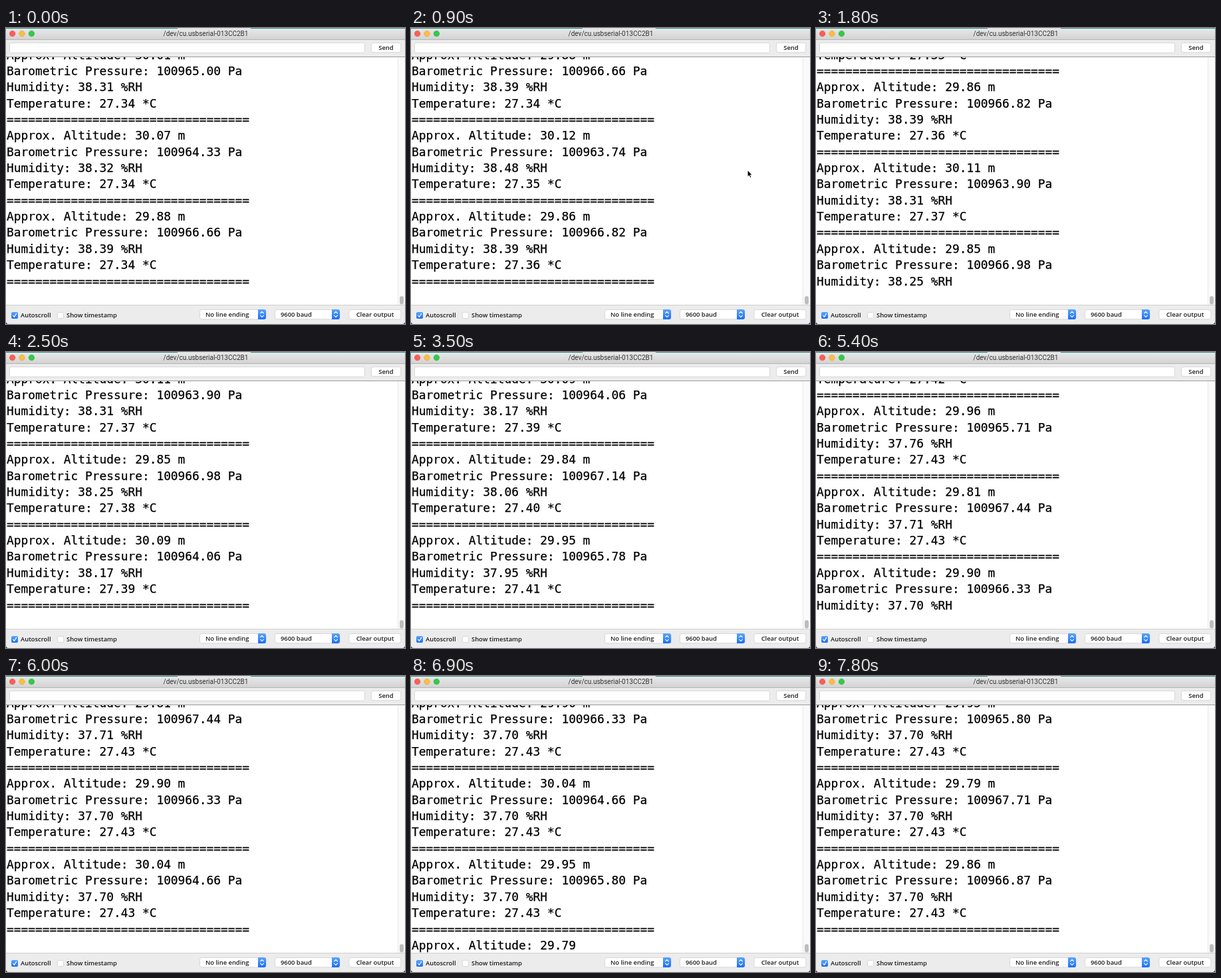
Animation of 600x446 px, one loop 7900 ms. Source, as an HTML page:

```html
<!DOCTYPE html>
<html lang="en">
<head>
<meta charset="utf-8">
<title>Serial monitor</title>
<style>
  html, body { margin: 0; width: 100%; height: 100%; overflow: hidden; background: #ececec; }
  svg { display: block; width: 600px; height: 446px; }
  .ui { font: 600 9.4px "Open Sans", "Noto Sans", sans-serif; fill: #1c1c1c; }
  .title { font: 10px Roboto, sans-serif; fill: #333; }
  .mid { text-anchor: middle; }
  .box { fill: #fff; stroke: #d0d0d0; stroke-width: .8; }
  .chev { fill: none; stroke: #fff; stroke-width: 1.2; stroke-linecap: round; stroke-linejoin: round; }
  .log { font: 17.83px "DejaVu Sans Mono", monospace; stroke: #000; stroke-width: .25; }
</style>
</head>
<body>
<svg viewBox="0 0 600 446">
  <defs>
    <linearGradient id="bar" x2="0" y2="1">
      <stop stop-color="#e9e9e9"/><stop offset="1" stop-color="#d3d3d3"/>
    </linearGradient>
    <linearGradient id="blue" x2="0" y2="1">
      <stop stop-color="#5aa5fb"/><stop offset="1" stop-color="#1a6dfa"/>
    </linearGradient>
    <clipPath id="pane"><path d="M0 44H589V417H0Z"/></clipPath>
    <g id="arrows">
      <path d="M0 0H9a3 3 0 0 1 3 3V12a3 3 0 0 1-3 3H0Z" fill="url(#blue)"/>
      <path class="chev" d="M3.6 5.8L6 3.4L8.4 5.8M3.6 9.2L6 11.6L8.4 9.2"/>
    </g>
  </defs>

  <rect width="600" height="446" fill="#ececec"/>
  <rect width="600" height="17" fill="url(#bar)"/>
  <rect width="600" height="1" fill="#2f8f8c"/>
  <rect x="258" width="110" height="1" fill="#d8e4e2"/>
  <rect y="17" width="600" height="1" fill="#b4b4b4"/>
  <g stroke-width=".5">
    <circle cx="9.6" cy="8.5" r="4.3" fill="#fc5d57" stroke="#df4640"/>
    <circle cx="24" cy="8.5" r="4.3" fill="#fdbd3f" stroke="#de9f34"/>
    <circle cx="38.4" cy="8.5" r="4.3" fill="#34c84a" stroke="#27aa35"/>
  </g>
  <text class="title mid" x="300.5" y="12.2">/dev/cu.usbserial-013CC2B1</text>

  <rect class="box" x="5.4" y="22.4" width="534" height="15" rx="2"/>
  <rect class="box" x="549.4" y="22.4" width="44.4" height="14.4" rx="3"/>
  <text class="ui mid" x="571.5" y="32.7">Send</text>

  <rect y="43" width="600" height="374.5" fill="#fff"/>
  <rect y="43" width="600" height="1" fill="#9c9c9c"/>
  <rect x="589" y="44" width="11" height="373" fill="#fafafa"/>
  <rect x="589" y="44" width=".8" height="373" fill="#e4e4e4"/>
  <rect x="592" y="404" width="6" height="12.6" rx="3" fill="#bdbdbd"/>
  <g id="log" class="log" clip-path="url(#pane)"></g>
  <rect y="417" width="600" height=".8" fill="#c6c6c6"/>

  <rect x="8" y="428" width="10" height="10" rx="2" fill="url(#blue)"/>
  <path class="chev" d="M10.6 433.2L12.4 435.4L15.6 430.4"/>
  <text class="ui" x="22" y="436.2">Autoscroll</text>
  <rect class="box" x="77.4" y="428.4" width="9.2" height="9.2" rx="2"/>
  <text class="ui" x="91" y="436.2">Show timestamp</text>

  <rect class="box" x="291.4" y="424.4" width="99.4" height="14.4" rx="3"/>
  <use href="#arrows" x="379" y="424"/>
  <text class="ui" x="300" y="435">No line ending</text>
  <rect class="box" x="404.4" y="424.4" width="97.4" height="14.4" rx="3"/>
  <use href="#arrows" x="490" y="424"/>
  <text class="ui" x="413" y="435">9600 baud</text>
  <rect class="box" x="515.9" y="424.4" width="78" height="14.4" rx="3"/>
  <text class="ui mid" x="555" y="435">Clear output</text>

  <path d="M0 442a4 4 0 0 0 4 4H0ZM600 442a4 4 0 0 1-4 4H600Z" fill="#333"/>
  <path id="pointer" d="M506.2 214.4V224.2L508.5 222.1L510.1 225.6L511.7 224.9L510.2 221.5H513Z"
    fill="#000" stroke="#fff" stroke-width=".7"/>
</svg>
<script>
  const LOOP = 7900, TICK = 100;
  const ROWS = 16, PITCH = 24.35;
  const SHOWN = 3, COUNT = 18;             // blocks at the start and at the end
  const DELAY = 2.3, PERIOD = 5.15, SPAN = 3; // ticks between blocks and per block
  const FIRST = "Approx. Altitude: 00.00".length;

  const ramp = (x, from, to) => Math.min(1, Math.max(0, (x - from) / (to - from)));
  const smooth = x => x * x * (3 - 2 * x);

  // The pressure swings every second block, then slows down.
  function pressure(i) {
    const turns = i < 8 ? i / 2 : (i - 8) / 4.1;
    return 100965 + .08 * i + 1.5 * ramp(i, 0, 2) * Math.cos(2 * Math.PI * turns);
  }
  const altitude = p => 30.014 - .083 * (p - 100965);
  const humidity = i => 38.31 + .17 * Math.exp(-((i - 3) ** 2) / 1.44) - .61 * smooth(ramp(i, 4.5, 12.5));
  const temperature = i => 27.34 + .093 * ramp(i, 1.5, 11.5);

  const blocks = Array.from({ length: COUNT }, (_, i) => {
    const p = pressure(i);
    return `Approx. Altitude: ${altitude(p).toFixed(2)} m\n` +
      `Barometric Pressure: ${p.toFixed(2)} Pa\n` +
      `Humidity: ${humidity(i).toFixed(2)} %RH\n` +
      `Temperature: ${temperature(i).toFixed(2)} *C\n` +
      "=".repeat(34) + "\n";
  });

  const log = document.getElementById("log");
  const pointer = document.getElementById("pointer");
  const rows = Array.from({ length: ROWS }, (_, i) => {
    const row = document.createElementNS("http://www.w3.org/2000/svg", "text");
    row.setAttribute("x", 1);
    row.setAttribute("y", 46.6 + i * PITCH);
    return log.appendChild(row);
  });

  function printed(block, i, tick) {
    if (i < SHOWN) return block;
    const step = tick - Math.floor(DELAY + (i - SHOWN) * PERIOD);
    if (step < 0) return "";
    const part = ramp(step, 0, SPAN - 1);
    return block.slice(0, Math.round(FIRST + (block.length - FIRST) * part));
  }

  function draw(tick) {
    const text = blocks.map((block, i) => printed(block, i, tick)).join("");
    const lines = text.split("\n").slice(-ROWS);
    rows.forEach((row, i) => { row.textContent = lines[i]; });
    pointer.style.display = tick >= 5 && tick < 15 ? "" : "none";
  }

  const begin = performance.now();
  let last = -1;
  function frame() {
    const tick = Math.floor((performance.now() - begin) % LOOP / TICK);
    if (tick !== last) draw(last = tick);
    requestAnimationFrame(frame);
  }
  frame();
</script>
</body>
</html>
```
